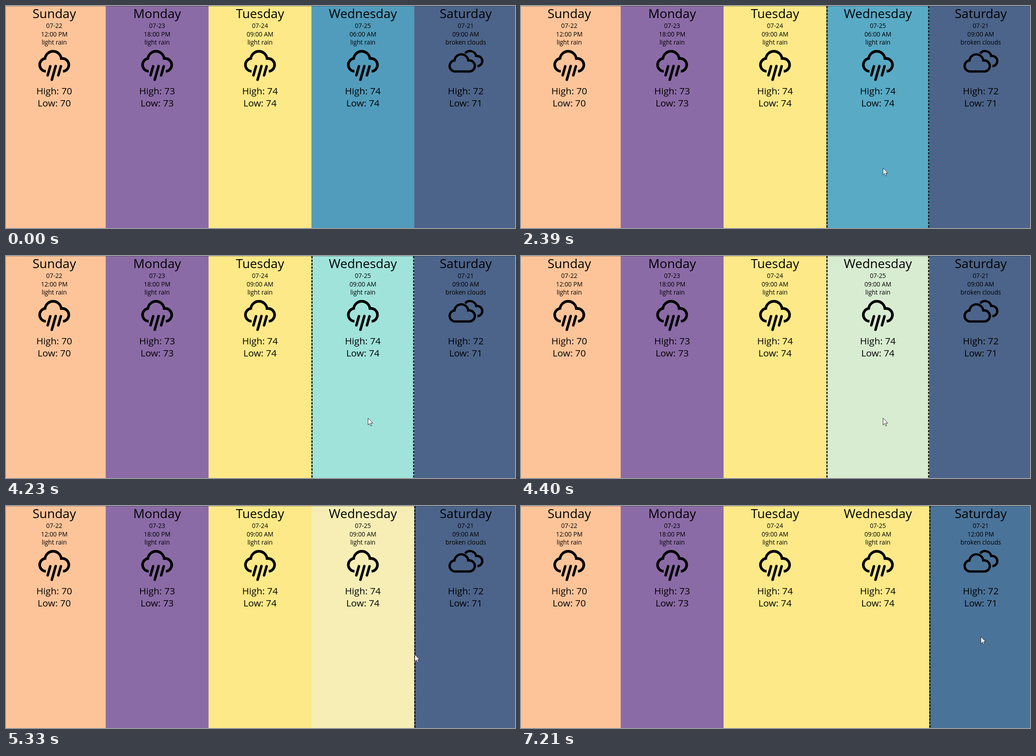
These frames come from a looping animation (1131 by 495 pixels, 8000 ms). An HTML page:

```html
<!DOCTYPE html>
<html lang="en">
<head>
<meta charset="utf-8">
<title>Five day forecast</title>
<style>
  html, body { margin: 0; width: 100%; height: 100%; overflow: hidden; }
  svg { display: block; }
  text { font-family: "Open Sans", sans-serif; text-anchor: middle; }
  .day { font-size: 28px; }
  .info { font-size: 13.7px; }
  .temp { font-size: 20.8px; }
  .icon { fill: none; stroke: #000; }
  .edge { stroke: #0c0c0c; stroke-width: 2.6; stroke-dasharray: 5.2 2.56; }
</style>
</head>
<body>
<svg id="stage" width="1131" height="495" viewBox="0 0 1131 495">
  <defs>
    <g id="rain" class="icon" stroke-width="1.68">
      <path d="M9.65 21.04A4.13 4.13 0 0 1 9.15 12.85A5.19 5.19 0 0 1 19.45 12.85H20.45A4.11 4.11 0 0 1 20.55 21.04"/>
      <path stroke-linecap="round" stroke-width="1.6" d="M12.47 17.85L10.84 23.6M15.92 17.7L13.46 26.4M19.2 17.85L17.58 23.6"/>
    </g>
    <g id="clouds" class="icon" stroke-width="1.46">
      <path d="M8.16 21.13A3.53 3.53 0 0 1 7.83 14.1A4.4 4.4 0 0 1 16.57 14.1H17.43A3.52 3.52 0 0 1 17.43 21.13Z"/>
      <path d="M14.6 9.6A4 4 0 0 1 21.6 11.3H22.2A3.2 3.2 0 0 1 22.4 17.7"/>
    </g>
    <path id="arrow" d="M.5 .5V15.8L4 12.5L6.4 18L8.7 17L6.3 11.6H11Z"/>
  </defs>
  <g id="columns"></g>
  <rect width="1131" height="1" fill="#000" opacity=".3"/>
  <path id="wedEdges" class="edge" d="M679.9 0V494M905.9 0V494"/>
  <path id="satEdge" class="edge" d="M908.5 0V494"/>
  <use id="trail" href="#arrow" x="908" y="331" fill="#558f82"/>
  <use id="cursor" href="#arrow" fill="#fff" stroke="#1a1a1a" stroke-width=".9"/>
</svg>
<script>
const LOOP = 8000, STEP = 80, FADE = 450, LEAD = 20;
const COL = 228.6, FIRST = -7.1;

const days = [
  ["Sunday", "07-22", "12:00 PM", "light rain", 70, 70, "#fdc499"],
  ["Monday", "07-23", "18:00 PM", "light rain", 73, 73, "#8b6ba6"],
  ["Tuesday", "07-24", "09:00 AM", "light rain", 74, 74, "#fde987"],
  ["Wednesday", "07-25", "06:00 AM", "light rain", 74, 74, "#519cbc"],
  ["Saturday", "07-21", "09:00 AM", "broken clouds", 72, 71, "#4c648a"]
];

// [start time, colour reached]
const wedFades = [
  [0, [81, 156, 188]], [2300, [103, 197, 214]], [3310, [158, 227, 219]],
  [4230, [243, 240, 205]], [5240, [253, 233, 135]]
];
const satFades = [[0, [76, 100, 138]], [6280, [74, 115, 153]]];

// [time, x, y] of the pointer tip
const moves = [
  [1460, 874, 463], [1540, 836, 409], [1620, 815, 378], [1700, 807, 365], [1770, 804, 361],
  [5320, 908, 331], [5410, 1000, 294.5], [5490, 1014, 292], [5570, 1021.5, 291]
];

const byId = id => document.getElementById(id);
const label = (cls, x, y, s) => `<text class="${cls}" x="${x}" y="${y}">${s}</text>`;

byId("columns").innerHTML = days.map(([day, date, hour, sky, high, low, fill], i) => {
  const x = FIRST + COL * i, mid = x + COL / 2;
  const icon = sky === "light rain" ? "rain" : "clouds";
  return `<g><rect x="${x}" width="${1140 - x}" height="495" fill="${fill}"/>`
    + label("day", mid, 26.5, day)
    + label("info", mid, 49.3, date)
    + label("info hour", mid, 67.8, hour)
    + label("info", mid, 86.2, sky)
    + `<use href="#${icon}" transform="translate(${mid - 52.5} 72) scale(3.5)"/>`
    + label("temp", mid, 196.6, "High: " + high)
    + label("temp", mid, 224, "Low: " + low) + "</g>";
}).join("");

const [wed, sat] = [3, 4].map(i => {
  const g = byId("columns").children[i];
  return { rect: g.querySelector("rect"), hour: g.querySelector(".hour") };
});

// CSS "ease": cubic-bezier(.25, .1, .25, 1)
function ease(x) {
  if (x >= 1) return 1;
  let lo = 0, hi = 1;
  for (let i = 0; i < 20; i++) {
    const u = (lo + hi) / 2, v = 1 - u;
    if (.75 * v * v * u + .75 * v * u * u + u * u * u < x) lo = u; else hi = u;
  }
  const v = 1 - lo;
  return .3 * v * v * lo + 3 * v * lo * lo + lo ** 3;
}

function colourAt(fades, t) {
  const n = fades.findLastIndex(f => t >= f[0]);
  const [start, to] = fades[n];
  const from = n ? fades[n - 1][1] : to;
  const held = Math.floor((t - start) / STEP) * STEP;
  const p = ease((held + LEAD) / FADE);
  return `rgb(${to.map((c, i) => Math.round(from[i] + (c - from[i]) * p))})`;
}

const show = (el, on) => el.setAttribute("visibility", on ? "visible" : "hidden");

function draw(t) {
  wed.rect.setAttribute("fill", colourAt(wedFades, t));
  sat.rect.setAttribute("fill", colourAt(satFades, t));
  wed.hour.textContent = t < 4230 ? "06:00 AM" : "09:00 AM";
  sat.hour.textContent = t < 7210 ? "09:00 AM" : "12:00 PM";

  const spot = moves.findLast(m => t >= m[0]);
  show(byId("cursor"), spot);
  if (spot) {
    byId("cursor").setAttribute("x", spot[1]);
    byId("cursor").setAttribute("y", spot[2]);
  }
  show(byId("wedEdges"), t >= 1460 && t < 5320);
  show(byId("satEdge"), t >= 5320);
  show(byId("trail"), t >= 5410 && t < 5490);
}

const begin = performance.now();
function tick() {
  draw((performance.now() - begin) % LOOP);
  requestAnimationFrame(tick);
}
tick();
</script>
</body>
</html>
```
